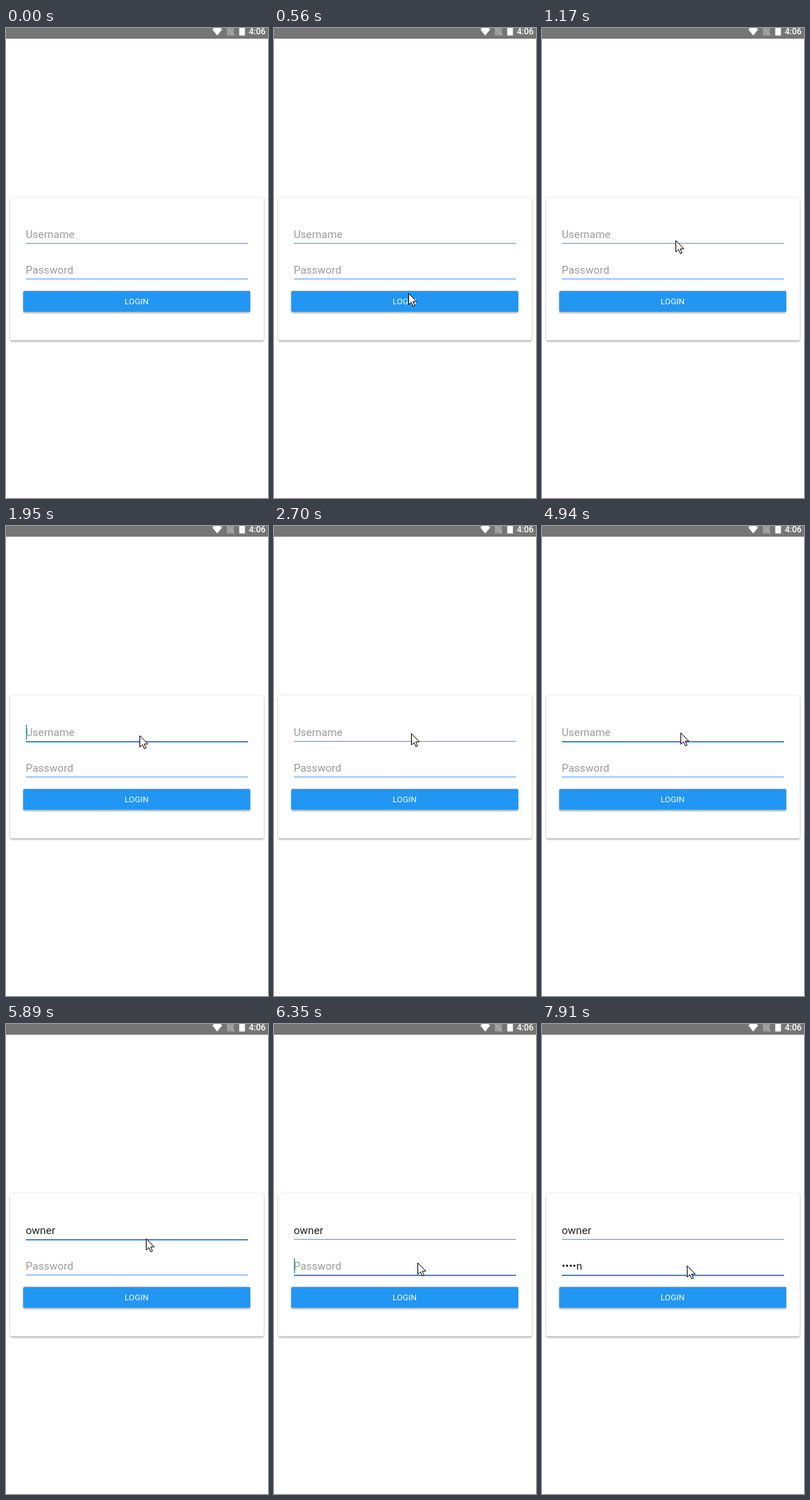
Recreate the animation shown at these times as an HTML page. Size 369x660 px, loop 7.99 s.

```html
<!DOCTYPE html>
<html lang="en">
<head>
<meta charset="utf-8">
<title>Login form</title>
<style>
  html, body { margin: 0; width: 100%; height: 100%; overflow: hidden; background: #fff; }
  svg { display: block; width: 100%; height: 100%; font: 15.2px Roboto, sans-serif; }
  .raised { filter: drop-shadow(0 2px 1px rgba(0,0,0,.24)) drop-shadow(0 .5px .8px rgba(0,0,0,.16)); }
</style>
</head>
<body>
<svg viewBox="0 0 369 660">
  <rect width="369" height="660" fill="#fff"/>
  <rect width="369" height="15" fill="#757575"/>
  <g fill="#fff">
    <path d="M290.500 2Q297.500 -4 304.500 2L297.500 10.500Z"/>
    <path d="M328.500 0H330V-1H335V0H336.500V10.500H328.500Z"/>
    <path d="M311 2L314 -1H321V10.500H311Z" opacity=".28"/>
    <path d="M310 -1L322 10.500" stroke="#bdbdbd"/>
    <text x="342" y="9" font-size="12" font-weight="500">4:06</text>
  </g>
  <rect class="raised" x="6" y="238" width="357" height="200.500" rx="2" fill="#fff"/>
  <g id="user"><text x="27.700" y="295"/><rect x="28" width="313"/><rect y="279" width="1.500" height="21" fill="#26a69a"/></g>
  <g id="pass" transform="translate(0 50)"><text x="27.700" y="295"/><rect x="28" width="313"/><rect y="279" width="1.500" height="21" fill="#26a69a"/></g>
  <rect id="button" class="raised" x="24.300" y="369.300" width="319.700" height="29.200" rx="1.500"/>
  <text x="184" y="388" font-size="11.800" fill="#fff" text-anchor="middle">LOGIN</text>
  <g id="pointer">
    <circle id="ring" cx=".5" cy=".5" r="11" fill="none" stroke="#000"/>
    <path d="M.5 .5V16.500L4.300 13.100L6.900 18.900L9.300 17.800L6.700 12.100H11.800Z"
          fill="#fff" stroke="#000" stroke-linejoin="round"/>
  </g>
</svg>
<script>
const LOOP = 7990, TICK = 77, BLINK = 500;
const $ = id => document.getElementById(id);
const clamp = (v, max) => Math.max(0, Math.min(max, v));

// how many ticks have begun since a moment, the first one at the moment itself
const ticks = (t, from) => Math.max(0, Math.floor((t - from) / TICK) + 1);

// pointer moves: start time, number of steps, destination
const moves = [
  [70, 7, 189, 372], [640, 3, 189, 313], [870, 5, 188, 294], [2120, 1, 193, 291],
  [4160, 1, 195, 290], [5890, 4, 202, 335], [7910, 1, 204, 339]
];

const fields = [
  { id: 'user', hint: 'Username', word: 'owner', typing: 5170, perTick: 2, focus: [[1920, 2700], [4440, 6350]] },
  { id: 'pass', hint: 'Password', word: 'token', typing: 6900, perTick: 1, focus: [[6350, LOOP]], secret: true }
];
const clicks = fields.flatMap(f => f.focus.map(span => span[0]));

function drawField(f, t) {
  const begun = ticks(t, f.typing);
  const count = begun && clamp((begun - 1) * f.perTick + 1, f.word.length);
  const typed = f.word.slice(0, count);
  const shown = f.secret ? typed.replace(/.(?=.)/g, '•') : typed;
  const span = f.focus.find(([a, b]) => t >= a && t < b);

  const [text, line, caret] = $(f.id).children;
  text.textContent = shown || f.hint;
  text.setAttribute('fill', shown ? '#212121' : '#9b9b9b');
  line.setAttribute('y', span ? 302 : 301.9);
  line.setAttribute('height', span ? 2 : 1.1);
  line.setAttribute('fill', span ? '#4088f5' : '#599ff7');

  // the caret stays lit for one blink after the last focus or key
  const lastKey = f.typing + clamp(t - f.typing, TICK * Math.floor((f.word.length - 1) / f.perTick));
  const lit = span && t - (count ? lastKey : span[0]) < BLINK;
  caret.setAttribute('x', 28 + (shown ? text.getComputedTextLength() : 0));
  caret.setAttribute('opacity', lit ? 1 : 0);
}

function drawPointer(t) {
  let x = 284, y = 641;
  for (const [start, steps, toX, toY] of moves) {
    const u = clamp(ticks(t, start) / steps, 1);
    x += (toX - x) * u;
    y += (toY - y) * u;
  }
  $('pointer').setAttribute('visibility', t < moves[0][0] ? 'hidden' : 'visible');
  $('pointer').setAttribute('transform', `translate(${Math.round(x)} ${Math.round(y)})`);
  $('ring').setAttribute('opacity', clicks.some(c => t >= c - 150 && t < c - 40) ? 1 : 0);
}

function draw(t) {
  fields.forEach(f => drawField(f, t));
  drawPointer(t);
  // the button darkens while it holds the focus
  const dark = t < 4440 ? clamp((t - 2700) / 400, 1) : 0;
  $('button').setAttribute('fill', `rgb(${33 - 2 * dark},${150 - 9 * dark},${243 - 13 * dark})`);
}

const start = performance.now();
function tick() {
  draw((performance.now() - start) % LOOP);
  requestAnimationFrame(tick);
}
tick();
</script>
</body>
</html>
```
